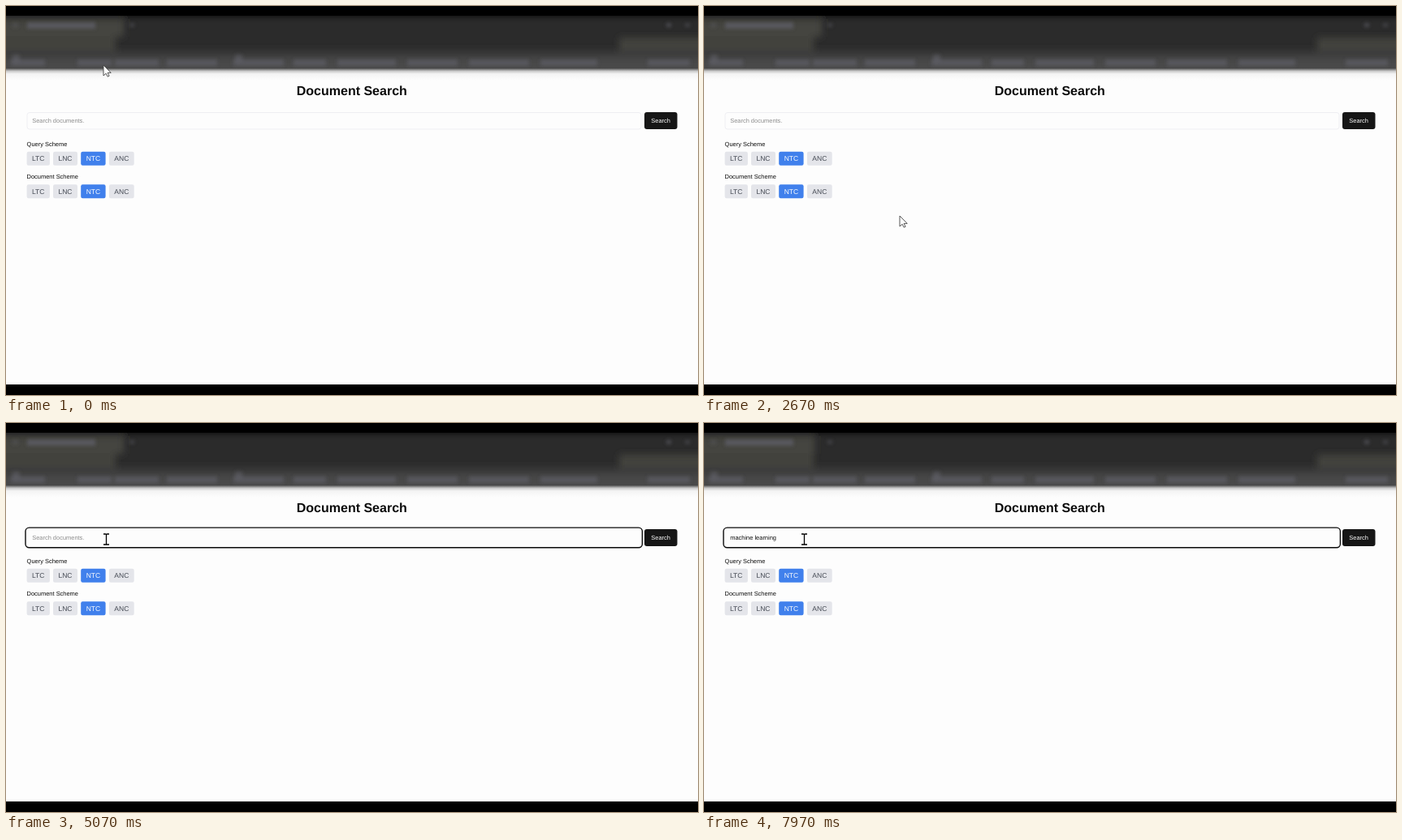
These frames come from a looping animation (852 px wide and 480 px high, 8 s). An HTML page:

```html
<!DOCTYPE html>
<html lang="en">
<head>
<meta charset="utf-8">
<title>Document Search</title>
<style>
  html, body { margin: 0; width: 100%; height: 100%; overflow: hidden; background: #000; }
  svg { display: block; width: 100%; height: 100%; }
  text { font-family: "Liberation Sans", Arial, sans-serif; font-size: 7.46px; fill: #0c0c0c; text-rendering: geometricPrecision; }
  .title { font-size: 16px; font-weight: bold; text-anchor: middle; }
  .pill text { font-size: 8.53px; fill: #454a54; text-anchor: middle; }
  .pill rect { fill: #e4e5ea; }
  .pill.on rect { fill: #4080ec; }
  .pill.on text, .button { fill: #fdfdfd; }
</style>
</head>
<body>
<svg viewBox="0 0 852 480">
  <defs>
    <linearGradient id="fade" x2="0" y2="1">
      <stop offset="0" stop-color="#555"/>
      <stop offset=".22" stop-color="#c8c8c8"/>
      <stop offset=".45" stop-color="#f4f4f4"/>
      <stop offset="1" stop-color="#fdfdfd"/>
    </linearGradient>
    <filter id="soft" x="-5%" y="-20%" width="110%" height="140%"><feGaussianBlur stdDeviation="4"/></filter>
    <filter id="smear" x="-5%" y="-50%" width="110%" height="200%"><feGaussianBlur stdDeviation="2"/></filter>
    <clipPath id="bar"><rect y="12" width="852" height="66"/></clipPath>
  </defs>

  <rect y="78" width="852" height="389" fill="#fdfdfd"/>
  <g clip-path="url(#bar)">
    <rect y="12" width="852" height="66" fill="#2b2b2b"/>
    <g filter="url(#soft)">
      <rect id="tab" x="-10" y="16" width="155" height="22" fill="#444440"/>
      <rect x="-10" y="37" width="145" height="22" fill="#42423e"/>
      <rect x="755" y="39" width="110" height="20" fill="#42423e"/>
      <rect x="-10" y="55" width="872" height="9" fill="#3b3b3b"/>
      <rect x="-10" y="64" width="872" height="20" fill="#484848"/>
      <rect x="-10" y="4" width="872" height="8" fill="#000"/>
    </g>
    <g id="blurs" filter="url(#smear)" fill="#62626c"></g>
  </g>
  <rect y="77" width="852" height="15" fill="url(#fade)"/>

  <text class="title" x="425.8" y="109.5">Document Search</text>
  <rect id="field" fill="#fdfdfd"/>
  <text id="query" x="32.2" y="144.2"></text>
  <path id="caret" d="M0 137v9" stroke="#000" stroke-width=".8"/>
  <rect x="786" y="131" width="40.5" height="21" rx="3" fill="#161616"/>
  <text class="button" x="794.3" y="144.2">Search</text>
  <text x="25.6" y="173">Query Scheme</text>
  <text x="25.6" y="213.3">Document Scheme</text>
  <g id="pills"></g>

  <path id="arrow" d="M0 0V13L3.1 10.2 5.2 14.2 7.1 13.2 5.1 9.4H9.2Z" fill="#fdfdfd" stroke="#444" stroke-width=".9"/>
  <path id="beam" d="M120 137h2.5q1 0 1 1 0-1 1-1h2.5M123.5 138v11M120 150h2.5q1 0 1-1 0 1 1 1h2.5" fill="none" stroke="#000" stroke-width="1.3"/>
</svg>
<script>
const LOOP = 8000, REACH_FIELD = 4350, CLICK = 4550, TYPE_START = 5300, KEY_GAP = 118;
const PHRASE = "machine learning";
const TYPE_END = TYPE_START + KEY_GAP * (PHRASE.length - 1);

// Pointer stops: time, x, y
const STOPS = [
  [0, 120, 73], [200, 124, 77], [900, 480, 150], [1450, 716, 184], [1630, 719, 181],
  [2300, 300, 268], [2670, 241, 259], [3150, 220, 252], [3700, 226, 288],
  [4140, 234, 282], [4200, 205, 140], [REACH_FIELD, 123, 143]
];

const $ = id => document.getElementById(id);

function add(parent, tag, attrs, content) {
  const node = document.createElementNS("http://www.w3.org/2000/svg", tag);
  setAttrs(node, attrs);
  if (content) node.textContent = content;
  return parent.appendChild(node);
}

function setAttrs(node, attrs) {
  for (const key in attrs) node.setAttribute(key, attrs[key]);
}

function show(node, visible) {
  node.style.display = visible ? "" : "none";
}

function buildPills(top) {
  const pills = [["LTC", 25.6, 28.3], ["LNC", 58, 30], ["NTC", 92.2, 30.4], ["ANC", 126.9, 30.8]];
  for (const [name, x, width] of pills) {
    const group = add($("pills"), "g", { class: name === "NTC" ? "pill on" : "pill" });
    add(group, "rect", { x, y: top, width, height: 17, rx: 2.2 });
    add(group, "text", { x: x + width / 2, y: top + 11.4 }, name);
  }
}

function buildBlurs() {
  const blur = (x, y, width, height, opacity) =>
    add($("blurs"), "rect", { x, y, width, height, opacity });
  blur(26, 20, 84, 8, .7);
  blur(8, 20, 7, 7, .3);
  blur(152, 21, 6, 5, .4);
  blur(813, 21, 6, 5, .6);
  blur(836, 21, 6, 5, .4);
  const labels = [[6, 42], [88, 42], [134, 54], [198, 62], [280, 62], [354, 40], [408, 72], [494, 62], [570, 74], [658, 70], [790, 52]];
  for (const [x, width] of labels) blur(x, 66, width, 8, .6);
  blur(8, 60, 9, 9, .5);
  blur(282, 60, 9, 9, .5);
}

function pointerAt(t) {
  const next = STOPS.findIndex(stop => stop[0] > t);
  if (next < 0) return STOPS.at(-1).slice(1);
  const [t0, x0, y0] = STOPS[next - 1], [t1, x1, y1] = STOPS[next];
  const u = (t - t0) / (t1 - t0), eased = u * u * (3 - 2 * u);
  return [x0 + (x1 - x0) * eased, y0 + (y1 - y0) * eased];
}

function drawField(t) {
  const focused = t >= CLICK;
  setAttrs($("field"), focused
    ? { x: 24, y: 129.1, width: 759.4, height: 24.6, rx: 4.5, stroke: "#0a0a0a", "stroke-width": 1.4 }
    : { x: 26, y: 131.5, width: 756, height: 20.5, rx: 3, stroke: "#e8e8ee", "stroke-width": .7 });

  const count = Math.max(0, Math.min(PHRASE.length, Math.floor((t - TYPE_START) / KEY_GAP) + 1));
  const query = $("query");
  query.textContent = count ? PHRASE.slice(0, count) : "Search documents.";
  query.style.fill = count ? "" : "#8c8c8c";

  const typing = t >= TYPE_START && t < TYPE_END;
  const blinkStart = t < TYPE_START ? CLICK : TYPE_END;
  show($("caret"), focused && (typing || (t - blinkStart) % 1000 < 500));
  const width = count ? query.getComputedTextLength() : 0;
  $("caret").setAttribute("transform", `translate(${32.5 + width} 0)`);
}

function draw(t) {
  drawField(t);
  const inField = t >= REACH_FIELD;
  show($("arrow"), !inField);
  show($("beam"), inField);
  $("arrow").setAttribute("transform", `translate(${pointerAt(t)})`);
  $("tab").setAttribute("width", t < 5800 ? 155 : 146);
}

function tick() {
  draw(performance.now() % LOOP);
  requestAnimationFrame(tick);
}

buildPills(179.8);
buildPills(220.2);
buildBlurs();
tick();
</script>
</body>
</html>
```
